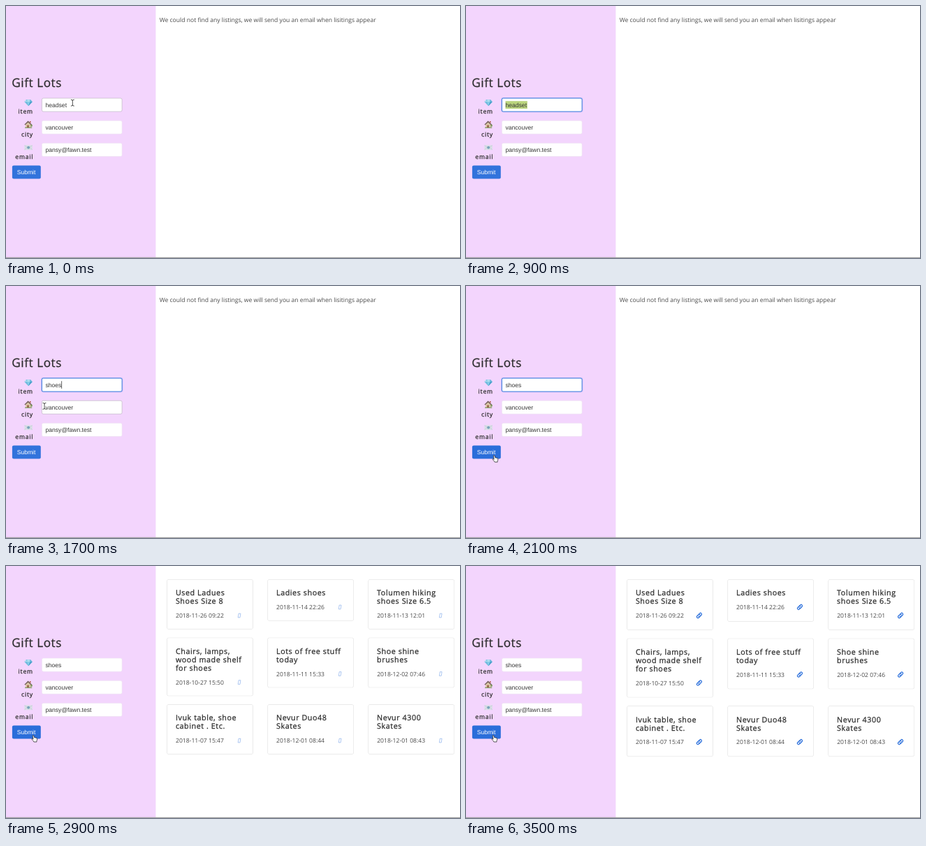
Animation, 650 px wide and 361 px high, one loop 4500 ms. Source, as an HTML page:

```html
<!DOCTYPE html>
<html lang="en">
<head>
<meta charset="utf-8">
<title>Listings</title>
<style>
  html, body { margin: 0; width: 100%; height: 100%; overflow: hidden; background: #fff; }
  svg { display: block; width: 650px; height: 361px; }
  text { font: 8.58px "Open Sans", sans-serif; fill: #4a4a4a; text-rendering: geometricPrecision; white-space: pre; }
  .brand, .label, .head { fill: #2b2b2b; stroke: #2b2b2b; stroke-width: .26; }
  .brand { font-size: 17.15px; letter-spacing: .56px; }
  .label { letter-spacing: .82px; }
  .head { font-size: 10.72px; letter-spacing: .58px; }
  .value, .send { font-family: "Liberation Sans", Arial, sans-serif; fill: #363636; }
  .send { fill: #fff; }
  .box { fill: #fff; stroke: #ebdff0; stroke-width: .54; }
  .box.hover { stroke: #b0a8b4; }
  .box.focus { stroke: #3273dc; stroke-width: .9; }
  .card { fill: #fff; stroke: rgba(10,10,10,.1); stroke-width: .54; filter: drop-shadow(0 .7px .5px rgba(10,10,10,.12)); }
  .link { fill: none; stroke: #2f72dc; stroke-width: 1.25; stroke-linecap: round; }
  .tofu { fill: none; stroke: #78a3e8; stroke-width: .6; }
</style>
</head>
<body>
<svg id="stage" viewBox="0 0 650 361" xmlns="http://www.w3.org/2000/svg">
  <rect width="650" height="361" fill="#fff"/>
  <rect width="214.4" height="361" fill="#f3d5fd"/>

  <text class="brand" x="8.3" y="116">Gift Lots</text>

  <!-- gem -->
  <g transform="translate(26.4 134.2)">
    <path d="M2.4 0H9L11.4 3 5.7 9 0 3Z" fill="#6bb9dc"/>
    <path d="M2.4 0 3.6 3H0ZM4 0h3.4L8 3H3.6Z" fill="#b4def0"/>
    <path d="M3.6 3H8L5.7 9Z" fill="#86cbe8"/>
    <path d="M8 3h3.4L5.7 9Z" fill="#4a9fca"/>
  </g>
  <!-- house -->
  <g transform="translate(26.4 164.4)">
    <circle cx="9.4" cy="6.8" r="2" fill="#7b9a62"/>
    <path d="M1.6 5 5.2 1.6 9 5v5.2H1.6Z" fill="#d9c4a4"/>
    <path d="M0 5.4 5.2.2l5.2 5.2-.9.8-4.3-4.1L.9 6.2Z" fill="#69544c"/>
    <path d="M7.6.7h1.4v2.6L7.6 2Z" fill="#a8553c"/>
    <path d="M4 6.4h2.2v3.8H4Z" fill="#8a4f3c"/>
    <path d="M.6 9.4h10.2v1.2H.6Z" fill="#849a66"/>
  </g>
  <!-- envelope -->
  <g transform="translate(26.4 199.2)">
    <rect width="11.4" height="7" rx=".6" fill="#dadfe7"/>
    <path d="M0 .4 5.7 4.4 11.4.4M0 6.8 4 3.2m7.4 3.6L7.4 3.2" fill="none" stroke="#b3bcc8" stroke-width=".5"/>
    <circle cx="5.7" cy="3.5" r="2" fill="#76a3b8"/>
  </g>

  <text class="label" x="17.6" y="154.4">item</text>
  <text class="label" x="22" y="186.6">city</text>
  <text class="label" x="13.3" y="218.7">email</text>

  <rect id="ring" x="50.2" y="130.9" width="117.1" height="21.4" rx="3" fill="#3273dc" fill-opacity=".3"/>
  <g id="fields"></g>
  <rect id="mark" y="136.2" height="11" fill="#bad47d"/>
  <text id="item" class="value" x="56.5" y="144.9"></text>
  <rect id="caret" y="136.2" width=".7" height="10.8" fill="#222"/>
  <text class="value" x="56.5" y="177">vancouver</text>
  <text class="value" x="56.5" y="209.2">pansy@fawn.test</text>

  <rect id="button" x="8.9" y="228.5" width="40.9" height="19" rx="2.1"/>
  <text class="send" x="15.7" y="241.2">Submit</text>

  <text id="empty" x="219.7" y="22.7">We could not find any listings, we will send you an email when lisitings appear</text>
  <g id="loose"></g>
  <g id="settled"></g>

  <rect y="359.2" width="650" height=".8" fill="#000" fill-opacity=".07"/>
  <rect y="360" width="650" height="1" fill="#a3a3a3"/>

  <g id="beam" fill="none" stroke-linecap="round">
    <path d="M-2-4.5Q0-4.5 0-3.2 0-4.5 2-4.5M0-3.4V3.4M-2 4.5Q0 4.5 0 3.2 0 4.5 2 4.5" stroke="#fff" stroke-width="1.7" stroke-opacity=".7"/>
    <path d="M-2-4.5Q0-4.5 0-3.2 0-4.5 2-4.5M0-3.4V3.4M-2 4.5Q0 4.5 0 3.2 0 4.5 2 4.5" stroke="#222" stroke-width=".8"/>
  </g>
  <path id="arrow" d="M0 0V9.2L2.1 7.2 3.5 10.4 4.9 9.8 3.5 6.7H6.5Z" fill="#111" stroke="#fff" stroke-width=".7"/>
  <path id="hand" d="M-.9.5Q-.7-.4.1-.2.6 0 .9.9L1.8 3.4Q2.6 2.7 3.2 3.5 4 3 4.4 3.9 5.4 3.6 5.5 4.8 5.8 6.6 4.9 8V9.4H.9Q.5 8.2-.9 7-2.3 5.6-2.1 5-1.4 4.3 0 5.6Z" fill="#fff" stroke="#222" stroke-width=".75" stroke-linejoin="round"/>
</svg>
<script>
const LOOP = 4500;
const $ = id => document.getElementById(id);
const show = (id, on) => { $(id).style.display = on ? '' : 'none'; };

const listings = [
  [['Used Ladues|Shoes Size 8', '2018-11-26 09:22'], ['Ladies shoes', '2018-11-14 22:26'], ['Tolumen hiking|shoes Size 6.5', '2018-11-13 12:01']],
  [['Chairs, lamps,|wood made shelf|for shoes', '2018-10-27 15:50'], ['Lots of free stuff|today', '2018-11-11 15:33'], ['Shoe shine|brushes', '2018-12-02 07:46']],
  [['Ivuk table, shoe|cabinet . Etc.', '2018-11-07 15:47'], ['Nevur Duo48|Skates', '2018-12-01 08:44'], ['Nevur 4300|Skates', '2018-12-01 08:43']]
];
const LINE = 12.06;
const half = 'M-.5 1.7H-2.6a1.7 1.7 0 0 1 0-3.4H-.2a1.7 1.7 0 0 1 1.6 1.8';
const link = `<g class="link" transform="rotate(-45)"><path d="${half}"/><path d="${half}" transform="rotate(180)"/></g>`;
const tofu = '<path class="tofu" d="M-.8-2.8H2L1.1 2.9H-1.7Z"/>';

function card(x, y, [title, date], extra, icon) {
  const lines = title.split('|');
  const h = lines.length * LINE + 46.9 + extra;
  const base = y + 30.5 + lines.length * LINE;
  const heads = lines.map((s, i) =>
    `<text class="head" x="${x + 12.4}" y="${y + 22.9 + i * LINE}">${s}</text>`).join('');
  return `<rect class="card" x="${x}" y="${y}" width="123" height="${h}" rx="2.2"/>${heads}
    <text x="${x + 12.5}" y="${base}">${date}</text>
    <g class="icon" transform="translate(${x + 103.4} ${base - 3.1})">${icon}</g>`;
}

function grid(extra, icon) {
  let y = 19.4, out = '';
  for (const row of listings) {
    row.forEach((entry, i) => { out += card(230.5 + i * 144.1, y, entry, extra, icon); });
    const most = Math.max(...row.map(e => e[0].split('|').length));
    y += most * LINE + 59.4 + extra;
  }
  return out;
}

$('loose').innerHTML = grid(0, tofu);
$('settled').innerHTML = grid(1.05, link);
$('fields').innerHTML = [0, 1, 2].map(i =>
  `<rect class="box" x="51.4" y="${132.1 + i * 32.15}" width="114.7" height="19.1" rx="2.1"/>`).join('');
const boxes = [...$('fields').children];
const icons = [...$('settled').querySelectorAll('.icon')];

// pointer stops: time, shape, x, y
const stops = [
  [0, 'beam', 95.3, 138.7], [100, 'beam', 92, 140], [200, 'beam', 89, 141],
  [300, 'beam', 70, 141], [400, 'beam', 38, 140], [500, 'beam', 19, 140],
  [900, ''], [1500, 'arrow', 20, 136.5], [1600, 'arrow', 32, 147],
  [1700, 'beam', 55, 172], [1800, 'beam', 56, 203], [1900, 'arrow', 47, 226],
  [2000, 'hand', 40.2, 242.8], [2200, 'hand', 39.6, 242.8], [2300, 'hand', 39, 242.6]
];
const drag = [[300, 70], [400, 56.5]];
const last = (list, t) => list.filter(s => s[0] <= t).pop();

function draw(t) {
  const [, shape, x, y] = last(stops, t);
  for (const id of ['beam', 'arrow', 'hand']) show(id, id === shape);
  if (shape) $(shape).setAttribute('transform', `translate(${x} ${y})`);

  const focus = t >= 200 && t < 2300;
  show('ring', focus);
  boxes[0].setAttribute('class', 'box' + (focus ? ' focus' : t < 200 ? ' hover' : ''));
  boxes[1].setAttribute('class', 'box' + (t >= 1700 && t < 1800 ? ' hover' : ''));
  boxes[2].setAttribute('class', 'box' + (t >= 1800 && t < 1900 ? ' hover' : ''));

  const typed = t < 1000 ? 'headset' : 'shoes'.slice(0, Math.floor(t / 100) - 9);
  if ($('item').textContent !== typed) $('item').textContent = typed;

  const from = t < 1000 && last(drag, t);
  show('mark', from);
  if (from) {
    $('mark').setAttribute('x', from[1]);
    $('mark').setAttribute('width', 87.8 - from[1]);
  }
  const caret = (t >= 200 && t < 300) || (t >= 1000 && t < 1900);
  show('caret', caret);
  if (caret) $('caret').setAttribute('x', 56.5 + $('item').getComputedTextLength());

  $('button').setAttribute('fill', t >= 2300 && t < 2700 ? '#2366d1' : t >= 2000 ? '#2a6eda' : '#3273dc');

  show('empty', t < 2900);
  show('loose', t >= 2900 && t < 3000);
  show('settled', t >= 3000);
  for (const g of icons) g.style.display = t >= 3500 ? '' : 'none';
}

const start = performance.now();
function tick() {
  draw((performance.now() - start) % LOOP);
  requestAnimationFrame(tick);
}
tick();
</script>
</body>
</html>
```
